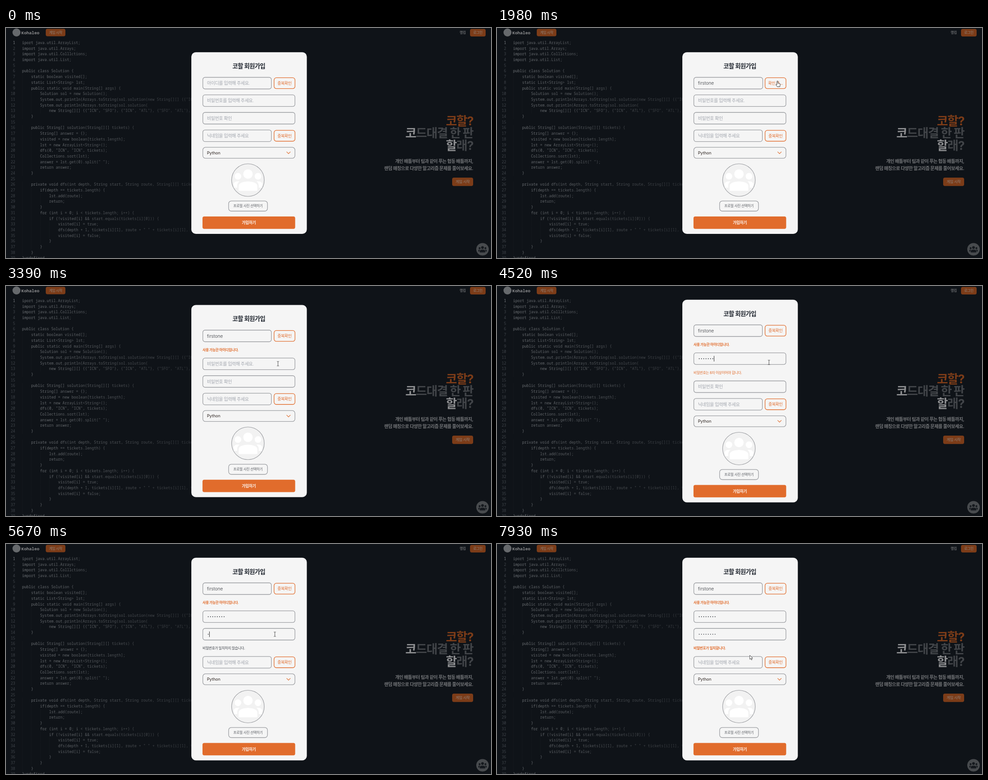
Recreate the animation shown at these times as an HTML page. Size 1086 by 515 pixels, loop 8 s.

```html
<!DOCTYPE html>
<html lang="ko">
<head>
<meta charset="utf-8">
<style>
  html, body { margin: 0; width: 100%; height: 100%; overflow: hidden; background: #0f1318; }
  svg { display: block; width: 100%; height: 100%; }
  text { font-family: Inter, 'Noto Sans CJK KR', 'Noto Sans CJK', sans-serif; white-space: pre; }
  .ko { letter-spacing: -.05em; }
  .mono { font-family: 'Noto Sans Mono', 'DejaVu Sans Mono', monospace; }
</style>
</head>
<body>
<svg id="stage" viewBox="0 0 1086 515" preserveAspectRatio="none"></svg>
<script>
const LOOP = 8000;
const ORANGE = '#e16c2c', PAPER = '#f5f5f5', GREY = '#9b9da1';
const DIM_ORANGE = '#7c3c18', DIM_WHITE = '#8c8d8f', DIM_LABEL = '#8f847d';
const CHAR = 5.04, LINE = 12.695, ROW = 23.5, DOT = 5.08, BLINK = 530;
const USER_ID = 'firstone';

const codeLines = String.raw`iport java.util.ArrayList;
import java.util.Arrays;
import java.util.Colllctions;
import java.util.List;

public class Solution {
    static boolean visited[];
    static List<String> lst;
    public static void main(String[] args) {
        Solution sol = new Solution();
        System.out.println(Arrays.toString(sol.solution(new String[][] {{"ICN", "
        System.out.println(Arrays.toString(sol.solution(
            new String[][] {{"ICN", "SFO"}, {"ICN", "ATL"}, {"SFO", "ATL"},
    }

    public String[] solution(String[][] tickets) {
        String[] answer = {};
        visited = new boolean[tickets.length];
        lst = new ArrayList<String>();
        dfs(0, "ICN", "ICN", tickets);
        Collections.sort(lst);
        answer = lst.get(0).split(" ");
        return answer;
    }

    private void dfs(int depth, String start, String route, String[][] tickets) {
        if(depth == tickets.length) {
            lst.add(route);
            return;
        }
        for (int i = 0; i < tickets.length; i++) {
            if (!visited[i] && start.equals(tickets[i][0])) {
                visited[i] = true;
                dfs(depth + 1, tickets[i][1], route + " " + tickets[i][1], tickets);
                visited[i] = false;
            }
        }
    }
}undefined`.split('\n');

const esc = s => s.replace(/&/g, '&amp;').replace(/</g, '&lt;');

// Text placed by the vertical centre of its glyphs.
function label(x, cy, size, str, fill, { weight = 400, anchor = 'start', cls = 'ko', id = '' } = {}) {
  return `<text id="${id}" class="${cls}" x="${x}" y="${cy + size * .37}" font-size="${size}" fill="${fill}"
    font-weight="${weight}" text-anchor="${anchor}">${str}</text>`;
}
function box(x, y, w, h, r, fill, stroke = 'none', id = '') {
  return `<rect id="${id}" x="${x}" y="${y}" width="${w}" height="${h}" rx="${r}" fill="${fill}"
    stroke="${stroke}" stroke-width="1.3"/>`;
}
const middle = (weight, id) => ({ weight, anchor: 'middle', id });

function people(x, y, scale, fill) {
  return `<g transform="translate(${x} ${y}) scale(${scale})" fill="${fill}">
    <circle cy="-13.5" r="10.5"/><circle cx="-22.5" cy="-8.5" r="7.5"/><circle cx="22.5" cy="-8.5" r="7.5"/>
    <path d="M-21 24V13Q-20 4 0 3Q20 4 21 13V24Z"/>
    <path d="M-19 3Q-30 2-32 8V17H-24V12Q-24 7-19 3ZM19 3Q30 2 32 8V17H24V12Q24 7 19 3Z"/></g>`;
}

function editor() {
  return codeLines.map((line, i) => {
    const code = line.trimStart(), indent = line.length - code.length, y = 36 + i * LINE;
    let guides = '';
    for (let c = 0; c < indent; c += 4)
      guides += `<path d="M${36.5 + c * CHAR} ${y - 9.5}v${LINE}" stroke="#1a1e23" stroke-width=".6"/>`;
    return `${guides}<text class="mono" font-size="8.4" x="20.5" y="${y}" text-anchor="end"
      fill="${i ? '#41464c' : '#83878b'}">${i + 1}</text>
      <text class="mono" font-size="8.4" x="${36 + indent * CHAR}" y="${y}" fill="url(#fade)">${esc(code)}</text>`;
  }).join('');
}

function backdrop() {
  const end = weight => ({ weight, anchor: 'end' });
  const headline = (y, first, rest, color) =>
    label(1046, y, 27.15, `<tspan fill="${color}">${first}</tspan>${rest}`, '#414448', end(700));
  const subline = (y, str) => label(1046, y, 10.2, str, '#737578', end(600));
  const button = (x, y, w, h, size, str) => box(x, y, w, h, 4, DIM_ORANGE)
    + label(x + w / 2, y + h / 2, size, str, DIM_LABEL, middle(500));
  return `<rect width="1086" height="515" fill="#0f1318"/>${editor()}
    <circle cx="23.5" cy="10" r="9" fill="#66696c"/>
    ${label(34.5, 10, 9.6, 'Kohaleo', DIM_WHITE, { weight: 700, cls: 'mono' })}
    ${button(89, 1.8, 44, 16.6, 7.92, '게임 시작')}
    ${label(1022.7, 10.5, 7.92, '랭킹', DIM_WHITE, middle(500))}
    ${button(1039, 2, 35, 17, 7.92, '로그인')}
    ${headline(207.5, '코할?', '', DIM_ORANGE)}
    ${headline(235, '코', '드대결 한 판', DIM_WHITE)}
    ${headline(263, '할', '래?', DIM_WHITE)}
    ${subline(298.5, '개인 배틀부터 팀과 같이 푸는 협동 배틀까지,')}
    ${subline(314, '랜덤 매칭으로 다양한 알고리즘 문제를 풀어보세요.')}
    ${button(999, 335, 47, 18.7, 8.5, '게임 시작')}
    <circle cx="1067" cy="495.5" r="14" fill="#484b4e"/>${people(1067, 495.5, .29, '#15191e')}`;
}

function field(id, width, placeholder, extra = '') {
  return `<g id="${id}">${box(440.7, .7, width, 26, 5, PAPER, GREY, id + 'Box')}
    ${label(450, 13.7, 10.2, placeholder, '#a3a7af', { weight: 300, id: id + 'Hint' })}
    <g id="${id}Dots" fill="#2b2f36"></g>
    <path id="${id}Caret" d="M0 7.5v12.5" stroke="#111" stroke-width=".9"/>
    ${label(440, 45, 7.92, '', ORANGE, { weight: 600, id: id + 'Msg' })}${extra}</g>`;
}
const checkButton = id => box(600.3, 1.6, 46.8, 24.3, 5, PAPER, ORANGE)
  + label(623.6, 13.8, 9.05, '중복확인', ORANGE, middle(500, id));

function modal() {
  return `${box(415, 54, 258.6, 407, 10, PAPER, 'none', 'panel')}
    <g id="title">${label(543.7, 85, 13.57, '코할 회원가입', '#20262f', middle(700))}</g>
    ${field('user', 153.6, '아이디를 입력해 주세요.', checkButton('userCheck')
      + label(450, 13.7, 10.2, '', '#33363b', { weight: 300, cls: '', id: 'userText' }))}
    ${field('pass', 206.3, '비밀번호를 입력해 주세요.')}
    ${field('again', 206.3, '비밀번호 확인')}
    ${field('nick', 153.6, '닉네임을 입력해 주세요', checkButton('nickCheck'))}
    <g id="rest">
      ${box(440.7, 267.2, 206.3, 24.5, 6, PAPER, GREY)}
      ${label(450, 279.3, 9.05, 'Python', '#2a211d', { cls: '' })}
      <path d="M628.3 277.2l4.3 4.3 4.3-4.3" fill="none" stroke="${ORANGE}" stroke-width="1.2"/>
      <circle cx="541.8" cy="340.5" r="36.5" fill="#f2f2f2" stroke="${GREY}" stroke-width="1.2"/>
      ${people(541.8, 340.5, 1, '#fff')}
      ${box(498.5, 387.3, 87, 22.7, 6, PAPER, GREY)}
      ${label(541.8, 398.5, 7.92, '프로필 사진 선택하기', '#5a5d63', middle(400))}
      ${box(440, 422, 207.5, 27.7, 4, ORANGE)}
      ${label(543.7, 435.7, 9.05, '가입하기', '#fbf3ee', middle(600))}
    </g>`;
}

const pointers = `<g id="pointer" stroke-linejoin="round">
  <path id="arrow" d="M0 0V9.2L2.2 7.2 3.7 10.6 5.2 9.9 3.8 6.6H6.6Z" fill="#fff" stroke="#222" stroke-width=".8"/>
  <path id="beam" d="M-2.3-4.9H-.6L0-4.4 .6-4.9H2.3M0-4.4V4.4M-2.3 4.9H-.6L0 4.4 .6 4.9H2.3" fill="none" stroke="#222" stroke-width=".8"/>
  <path id="hand" d="M-1.1 1.2a1.1 1.1 0 0 1 2.2 0V5l3.6.8q1.6.5 1.4 2.2L5.3 13H-.3L-3.6 8.6q.1-1.7 2.5-.3Z" fill="#fff" stroke="#222" stroke-width=".9"/></g>`;

const stage = document.getElementById('stage');
stage.innerHTML = `<defs><linearGradient id="fade" gradientUnits="userSpaceOnUse" x1="36" x2="560" y1="0" y2="0">
  <stop stop-color="#6c7074"/><stop offset="1" stop-color="#1c2025"/></linearGradient></defs>
  ${backdrop()}${modal()}${pointers}`;

const $ = id => document.getElementById(id);
const show = (id, on) => $(id).setAttribute('visibility', on ? 'visible' : 'hidden');
const shift = (id, y) => $(id).setAttribute('transform', `translate(0 ${y})`);

for (const id of ['pass', 'again'])
  $(id + 'Dots').innerHTML = Array.from({ length: 8 }, (_, i) =>
    `<circle cx="${452.8 + i * DOT}" cy="13.8" r=".95"/>`).join('');

const typing = {
  user: { focus: 1100, blur: 1910, keys: Array.from(USER_ID, (_, i) => 1170 + 70 * i) },
  pass: { focus: 2860, blur: 5470, keys: [3450, 3600, 3710, 3860, 4120, 4370, 4520, 4720] },
  again: { focus: 5470, blur: LOOP, keys: [5670, 5930, 6390, 6600, 6860, 7000, 7130, 7260] }
};

// Pointer stops: time, x, y.
const path = [
  [330, 946, 51], [890, 511, 123], [1580, 511, 123], [1720, 590, 159], [1850, 628, 118.5],
  [2340, 628, 118.5], [2410, 633, 111], [2640, 613, 212], [2830, 609, 174], [4120, 609, 174],
  [4300, 609, 171], [4650, 609, 171], [4720, 605.5, 184], [4930, 606, 252], [5290, 606, 252],
  [5470, 602, 202], [5930, 602, 202], [6130, 602, 198], [6390, 602, 198], [6460, 601, 196],
  [7320, 601, 196], [7590, 568, 248], [7790, 568, 248], [7930, 566, 249]
];
const shapes = [[0, 'arrow'], [820, 'beam'], [1790, 'hand'], [2440, 'beam'], [7450, 'arrow']];

function pointerAt(t) {
  const next = path.findIndex(p => p[0] > t);
  if (next < 0) return path[path.length - 1].slice(1);
  if (next === 0) return path[0].slice(1);
  const [t0, x0, y0] = path[next - 1], [t1, x1, y1] = path[next];
  const u = (t - t0) / (t1 - t0), e = u * u * (3 - 2 * u);
  return [x0 + (x1 - x0) * e, y0 + (y1 - y0) * e];
}

function drawTyping(id, t) {
  const { focus, blur, keys } = typing[id];
  const count = keys.filter(k => k <= t).length;
  const last = count ? keys[count - 1] : focus;
  show(id + 'Hint', !count);
  show(id + 'Caret', t >= focus && t < blur && Math.floor((t - last) / BLINK) % 2 === 0);
  let width = count * DOT;
  if (id === 'user') {
    $('userText').textContent = USER_ID.slice(0, count);
    width = count ? $('userText').getComputedTextLength() : 0;
  } else {
    [...$(id + 'Dots').children].forEach((dot, i) =>
      dot.setAttribute('visibility', i < count ? 'visible' : 'hidden'));
  }
  $(id + 'Caret').setAttribute('transform', `translate(${450.5 + width} 0)`);
}

function message(id, on, str, fill, weight) {
  show(id + 'Msg', on);
  $(id + 'Msg').textContent = str;
  $(id + 'Msg').setAttribute('fill', fill);
  $(id + 'Msg').setAttribute('font-weight', weight);
}

function render(t) {
  const available = t >= 2050, tooShort = t >= 3450 && t < 4720, compared = t >= 5670, equal = t >= 7260;
  const rows = available + tooShort + compared;
  const top = -rows * ROW / 2;
  $('panel').setAttribute('y', 54.2 + top);
  $('panel').setAttribute('height', 406.8 + rows * ROW);
  shift('title', top);
  shift('user', 109.8 + top);
  shift('pass', 149 + top + available * ROW);
  shift('again', 188.3 + top + (available + tooShort) * ROW);
  shift('nick', 227.6 - top);
  shift('rest', -top);

  message('user', available, '사용 가능한 아이디입니다.', ORANGE, 600);
  message('pass', tooShort, '비밀번호는 8자 이상이어야 합니다.', ORANGE, 400);
  message('again', compared, equal ? '비밀번호가 일치합니다.' : '비밀번호가 일치하지 않습니다.',
    equal ? ORANGE : '#3c4048', equal ? 600 : 500);
  show('nickCaret', false);

  const checking = t >= 1980 && t < 2050;
  $('userCheck').textContent = checking ? '확인 중...' : '중복확인';
  $('userBox').setAttribute('width', checking ? 154.3 : 153.6);
  Object.keys(typing).forEach(id => drawTyping(id, t));

  const shape = shapes.filter(s => s[0] <= t).pop()[1];
  for (const name of ['arrow', 'beam', 'hand']) show(name, t >= 330 && name === shape);
  $('pointer').setAttribute('transform', `translate(${pointerAt(t).join(' ')})`);
}

const start = performance.now();
function tick() {
  render((performance.now() - start) % LOOP);
  requestAnimationFrame(tick);
}
tick();
</script>
</body>
</html>
```
